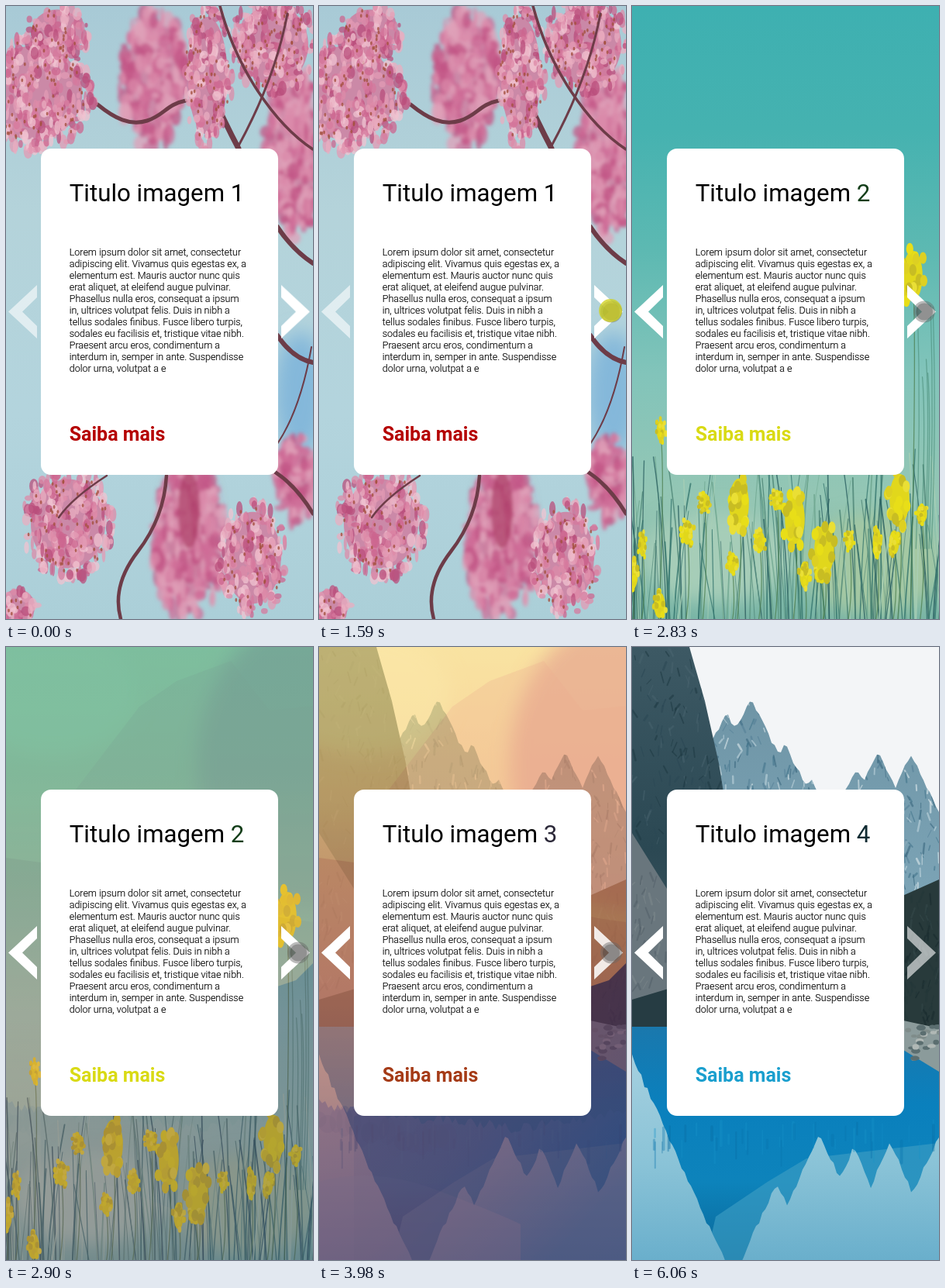
An HTML page for the animation above (6870 ms loop, 396 by 791 pixels).

```html
<!DOCTYPE html>
<html lang="pt">
<head>
<meta charset="utf-8">
<title>Carrossel</title>
<style>
html, body { margin: 0; width: 100%; height: 100%; overflow: hidden; }
svg { display: block; width: 100vw; height: 100vh; }
text { font-family: Roboto, Arial, sans-serif; }
</style>
</head>
<body>
<svg id="stage" viewBox="0 0 396 791" preserveAspectRatio="none"></svg>
<script>
const LOOP = 6870, W = 396, H = 791;
const stage = document.getElementById('stage');

let seed = 7;
const rnd = (a = 0, b = 1) => {
  seed = (seed * 16807) % 2147483647;
  return a + (b - a) * seed / 2147483647;
};
const pick = list => list[Math.floor(rnd(0, list.length))];
const repeat = (n, make) => Array.from({ length: Math.round(n) }, (_, i) => make(i)).join('');

// SVG builders
const ellipse = (x, y, rx, ry, fill, opacity = 1) =>
  `<ellipse cx="${x.toFixed(1)}" cy="${y.toFixed(1)}" rx="${rx.toFixed(1)}" ry="${ry.toFixed(1)}" fill="${fill}" opacity="${opacity}"/>`;
const shape = (d, fill, opacity = 1) => `<path d="${d}" fill="${fill}" opacity="${opacity}"/>`;
const line = (d, color, width, opacity = 1) =>
  `<path d="${d}" fill="none" stroke="${color}" stroke-width="${width}" stroke-linecap="round" opacity="${opacity}"/>`;
const rect = fill => `<rect width="${W}" height="${H}" fill="${fill}"/>`;
const blur = (size, content) => `<g filter="url(#blur${size})">${content}</g>`;
const clipped = (id, d, content) =>
  `<clipPath id="${id}"><path d="${d}"/></clipPath><g clip-path="url(#${id})">${content}</g>`;
const blurFilter = (size, deviation) =>
  `<filter id="blur${size}" filterUnits="userSpaceOnUse" x="-40" y="-40" width="476" height="871"><feGaussianBlur stdDeviation="${deviation}"/></filter>`;

// Colours are spread evenly along the gradient
const gradient = (id, colors, x = 0, y = 1) =>
  `<linearGradient id="${id}" x1="0" y1="0" x2="${x}" y2="${y}">` +
  colors.map((c, i) => `<stop offset="${i / (colors.length - 1)}" stop-color="${c}"/>`).join('') +
  '</linearGradient>';

function inside(cx, cy, rx, ry) {
  const a = rnd(0, Math.PI * 2), r = Math.sqrt(rnd());
  return [cx + Math.cos(a) * rx * r, cy + Math.sin(a) * ry * r];
}

// Outline of triangular peaks; dir 1 points up, -1 points down
function ridge(tips, slope, dir, rough) {
  let d = `M0 ${H}`;
  for (let x = 0; x <= W; x += 4) {
    const ys = tips.map(([tx, ty]) => ty + dir * slope * Math.abs(x - tx));
    const y = (dir > 0 ? Math.min : Math.max)(...ys) + rnd(-rough, rough);
    d += `L${x} ${y.toFixed(1)}`;
  }
  return d + `L${W} ${H}Z`;
}

const flecks = (n, x0, x1, y0, y1, colors) => repeat(n, () => {
  const x = rnd(x0, x1), y = rnd(y0, y1);
  return line(`M${x} ${y}l${rnd(-6, 6)} ${rnd(4, 14)}`, pick(colors), rnd(1, 3), .55);
});

function blossoms() {
  const soft = ['#d98aa9', '#cf6c97', '#c25586', '#dfa0b8'];
  const crisp = ['#e9adc0', '#dd8ba8', '#cc668f', '#f0c3d0', '#d67a9e', '#b94f7c', '#e39bb4'];
  const distant = [[190, 95, 44, 90], [372, 190, 38, 110], [235, 690, 48, 100], [375, 610, 30, 55]];
  const near = [[36, 112, 78, 76], [66, 35, 42, 38], [260, 90, 32, 95], [345, 50, 56, 65], [80, 668, 60, 72], [318, 712, 46, 74], [15, 775, 28, 28]];
  const petals = ([x, y, rx, ry], colors, size) => ellipse(x, y, rx * .8, ry * .8, '#d17d9f', .85) +
    repeat(rx * ry / 18, () => ellipse(...inside(x, y, rx, ry), rnd(2, size), rnd(3, size * 1.7), pick(colors), .75));
  const stamens = ([x, y, rx, ry]) => repeat(rx * ry / 75, () =>
    ellipse(...inside(x, y, rx * .9, ry * .9), 1.4, 2.4, '#a4503f', .8));
  const twig = (d, w) => line(d, '#6d3c48', w);
  return rect('url(#spring)') +
    blur('L', ellipse(380, 500, 34, 80, '#84b8da') + ellipse(238, 670, 24, 70, '#b23e6a')) +
    blur('M', distant.map(c => petals(c, soft, 9)).join('') + ellipse(236, 650, 14, 50, '#ac3c66', .7)) +
    blur('S', twig('M118 127C140 145 160 155 182 148S207 127 232 122', 5) +
      twig('M262 105Q282 150 300 184', 7) + twig('M350 285Q370 315 396 332', 6) +
      twig('M350 425Q370 455 396 460', 6) + twig('M350 565Q380 520 394 440', 2) +
      twig('M348 602Q375 620 396 655', 5) + near.map(c => petals(c, crisp, 6) + stamens(c)).join('') +
      twig('M207 606Q204 660 170 704T148 791', 4.5) + twig('M130 606Q85 635 68 660', 2.5) +
      twig('M276 0Q292 60 325 110T396 185', 3.5) + twig('M363 10Q347 95 298 184', 3));
}

function meadow() {
  const greens = ['#2f706a', '#477f70', '#6ba38c', '#a9cfb6', '#245a5c'];
  const yellows = ['#e8de18', '#ddd022', '#eadf35', '#c8bd23'];
  const tall = [[138, 642], [210, 662], [248, 702], [345, 636], [362, 348]].map(([x, y]) => [x, y, 17, 38]);
  const small = Array.from({ length: 14 }, (_, i) => [(i * .618 % 1) * W, rnd(610, 775), rnd(6, 11), rnd(13, 25)]);
  const stems = repeat(150, () => {
    const x = rnd(-10, 406), top = rnd(570, 700), lean = rnd(-22, 22);
    return line(`M${x} 800Q${x + lean * .2} ${top + 90} ${x + lean} ${top}`, pick(greens), rnd(.6, 1.9), .75);
  });
  const sideStems = repeat(6, () => {
    const x = rnd(352, 394);
    return line(`M${x} 700Q${x + 7} 540 ${x + 2} ${rnd(380, 500)}`, '#4a8c78', 1.3, .6);
  });
  const bloom = ([x, y, rx, ry]) => line(`M${x} ${y}Q${x + 6} ${y + 70} ${x - 3} 800`, '#4b7c4c', 1.3, .7) +
    ellipse(x, y, rx * .75, ry * .85, '#e1d71c') +
    repeat(18, () => ellipse(...inside(x, y, rx, ry), rx * .27, ry * .2, pick(yellows)));
  return rect('url(#meadow)') +
    blur('L', ellipse(110, 710, 100, 60, '#a6cdb8') + ellipse(310, 720, 90, 65, '#a4c8a3')) +
    blur('S', stems + sideStems + [[37, 548, 7, 16], ...small, ...tall].map(bloom).join(''));
}

function sunset() {
  const trees = repeat(16, i => ellipse(i * 11, 610 + i * 2 + rnd(-8, 8), rnd(8, 14), rnd(10, 24), '#723653', .3));
  return rect('url(#dusk)') +
    blur('L', ellipse(396, 150, 150, 190, '#dd745a', .65) + ellipse(60, 60, 110, 80, '#ffe283', .6)) +
    blur('S', shape('M90 184L172 77 220 44 290 18 340 82 396 76V330H45Z', '#e9895f', .28) +
      shape('M0 272L45 278 360 350 396 355V791H0Z', 'url(#haze)') +
      shape('M300 500L350 438 374 430 396 408V791H45V606Z', 'url(#night)') +
      shape(ridge([[0, 590], [150, 606], [396, 600]], .15, 1, 7), 'url(#forest)', .8) + trees +
      shape('M0 690Q70 670 150 700T260 745V791H0Z', '#763e5e', .45));
}

function lake() {
  const peaks = ridge([[122, 84], [153, 67], [197, 125], [230, 169], [290, 155], [317, 136], [360, 139]], 2, 1, 3);
  const cliff = 'M0 0H74L94 70 112 150 120 200V520H0Z';
  const sky = ridge([[130, 815], [200, 722], [268, 685], [308, 695], [362, 705]], 2.2, -1, 4);
  return rect('#f3f5f7') +
    blur('S', shape(peaks, 'url(#peaks)') +
      clipped('peakClip', peaks, flecks(420, 100, W, 70, 310, ['#e8f0f3', '#c6dae2', '#3f7289', '#527f95', '#35637a'])) +
      shape(cliff, 'url(#cliff)') +
      clipped('cliffClip', cliff, flecks(150, 0, 115, 0, 270, ['#1e3943', '#48636d', '#2b4855'])) +
      shape('M0 240L50 320V480H0Z', '#69767d') + flecks(40, 0, 45, 290, 450, ['#7e898d', '#525f67']) +
      shape('M0 455L50 440V500H0Z', '#263c43') +
      shape('M340 325L396 300V500H340Z', '#283a3b') + flecks(80, 350, W, 310, 480, ['#172a2d', '#34494a', '#223638'])) +
    shape('M0 490H396V791H0Z', 'url(#water)') +
    blur('S', shape('M350 482L396 492V548L350 520Z', '#8b9b9b') +
      repeat(22, () => ellipse(rnd(356, W), rnd(490, 535), rnd(3, 7), rnd(2, 4), pick(['#b0b8b5', '#5b6e70', '#7f8c8a']))) +
      shape('M95 791L108 735 175 690 225 660 396 640V791Z', '#3d9dc4', .65) +
      shape(sky, 'url(#mirror)') +
      repeat(45, () => line(`M${rnd(15, 390)} ${rnd(608, 640)}v${rnd(10, 35)}`, pick(['#0873ab', '#1792c8', '#0969a0']), rnd(1, 4), .35)));
}

const defs = blurFilter('S', .7) + blurFilter('M', 2.2) + blurFilter('L', 12) +
  gradient('spring', ['#a8cad6', '#b4d3da', '#b3d4dd', '#abcfd8']) +
  gradient('meadow', ['#3eb0b1', '#45b2b0', '#5db9b2', '#82c4ba', '#94c6b4', '#78b4a5']) +
  gradient('dusk', ['#fdda78', '#f9c06c', '#e58d60', '#a85a5d', '#67375e']) +
  gradient('haze', ['#e39159', '#d97b5c', '#b0605c', '#6c3a5e']) +
  gradient('night', ['#7d435a', '#5a3253', '#3f315f'], 1) +
  gradient('forest', ['#803f59', '#6f395a', '#3e305f'], 1, .5) +
  gradient('peaks', ['#6f95a6', '#7ba3b5', '#4f88a8', '#4f88a8']) +
  gradient('cliff', ['#3d5964', '#2b4853', '#4c6069']) +
  gradient('water', ['#1a78ad', '#0a80bd', '#0d83bb', '#0a6798']) +
  gradient('mirror', ['#a5d0df', '#8ac3d7', '#65acca']);

const slides = [
  { paint: blossoms, digit: '#000', link: '#b50000' },
  { paint: meadow, digit: '#123d18', link: '#d9da14' },
  { paint: sunset, digit: '#2b2838', link: '#a53b17' },
  { paint: lake, digit: '#102b32', link: '#1a9fce' }
];

const copy = ['Lorem ipsum dolor sit amet, consectetur', 'adipiscing elit. Vivamus quis egestas ex, a',
  'elementum est. Mauris auctor nunc quis', 'erat aliquet, at eleifend augue pulvinar.',
  'Phasellus nulla eros, consequat a ipsum', 'in, ultrices volutpat felis. Duis in nibh a',
  'tellus sodales finibus. Fusce libero turpis,', 'sodales eu facilisis et, tristique vitae nibh.',
  'Praesent arcu eros, condimentum a', 'interdum in, semper in ante. Suspendisse', 'dolor urna, volutpat a e'];

const chevron = 'M37 -34.5L0 0 37 34.5V18.5L18 0 37 -18.5Z';

stage.innerHTML = `<defs>${defs}</defs>` +
  slides.map((s, i) => `<g id="slide${i}">${s.paint()}</g>`).join('') +
  `<path id="prev" d="${chevron}" transform="translate(3 394.5)" fill="#fff"/>
  <path id="next" d="${chevron}" transform="translate(392 394.5) scale(-1 1)" fill="#fff"/>
  <rect x="45" y="184" width="306" height="421" rx="13" fill="#fff"/>
  <text x="81.7" y="252" font-size="31.25">Titulo imagem <tspan id="digit">1</tspan></text>
  <g font-size="12.5" font-weight="300" stroke="#000" stroke-width=".15">${copy.map((row, i) => `<text x="81.7" y="${322 + i * 15}">${row}</text>`).join('')}</g>
  <text id="link" x="81.7" y="561" font-size="25" font-weight="700">Saiba mais</text>
  <g id="pointer"><circle r="14" fill="#666" fill-opacity=".45"/><circle r="11" fill="#333" fill-opacity=".3"/></g>
  <circle id="press" cx="376" cy="393" r="15" fill="#cfd018" fill-opacity=".75"/>`;

const el = id => document.getElementById(id);
const layers = slides.map((_, i) => el('slide' + i));
const [prev, next, digit, link, pointer, press] = ['prev', 'next', 'digit', 'link', 'pointer', 'press'].map(el);

const ENTER = 230, ARRIVE = 920, LEAVE = 5650, GONE = 6060, STEP = 70;
const fades = [[1710, 1910], [2900, 3050], [3980, 4120]];
const presses = [[1590, 1710], [2700, 2830], [3780, 3980], [4790, 4990]];

// Each fade is shown in three equal steps
function fadeLevel(t, [start, end]) {
  if (t < start) return 0;
  return Math.min(3, Math.floor((t - start) / ((end - start) / 2)) + 1) / 3;
}

function pointerAt(t) {
  if (t < LEAVE) {
    const p = Math.min(1, Math.floor((t - ENTER) / STEP) * STEP / (ARRIVE - ENTER));
    return [333 + 44 * Math.max(0, p) ** 1.6, 394.5 + 367 * (1 - p) ** 2.2];
  }
  const p = Math.min(1, (Math.floor((t - LEAVE) / STEP) + 1) / 6);
  return [377 - 41 * p, 394.5 + 357 * p * p];
}

function draw(t) {
  const levels = [1, ...fades.map(f => fadeLevel(t, f))];
  const current = levels.filter(level => level > .5).length - 1;
  levels.forEach((level, i) => {
    layers[i].style.opacity = level;
    layers[i].style.display = level === 0 || levels[i + 1] === 1 ? 'none' : '';
  });
  digit.textContent = current + 1;
  digit.setAttribute('fill', slides[current].digit);
  link.setAttribute('fill', slides[current].link);
  prev.setAttribute('opacity', .6 + .4 * levels[1]);
  next.setAttribute('opacity', 1 - .4 * levels[3]);
  press.style.display = presses.some(([a, b]) => t >= a && t < b) ? '' : 'none';
  pointer.style.display = t >= ENTER && t < GONE ? '' : 'none';
  pointer.setAttribute('transform', `translate(${pointerAt(t)})`);
}

const begin = performance.now();
function tick() {
  draw((performance.now() - begin) % LOOP);
  requestAnimationFrame(tick);
}
tick();
</script>
</body>
</html>
```
